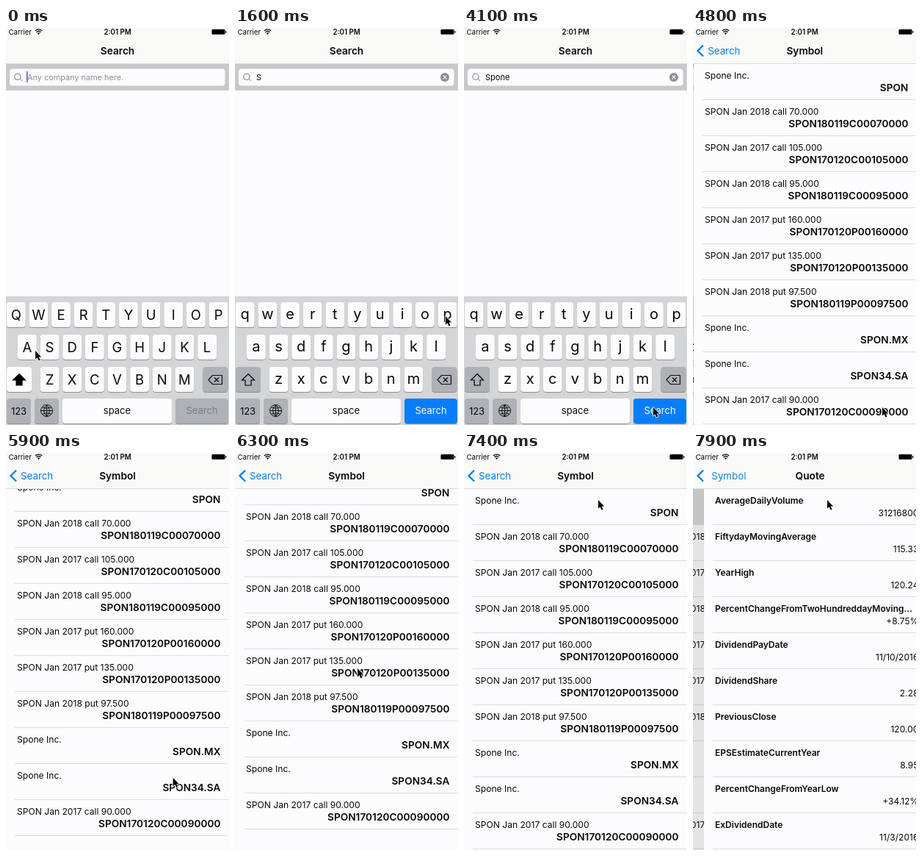
Animation, 304 px wide and 540 px high, one loop 8 s. Source, as an HTML page with a canvas:

```html
<!DOCTYPE html>
<html>
<head>
<meta charset="utf-8">
<style>
html, body { margin: 0; width: 100%; height: 100%; overflow: hidden; background: #fcfcff; }
canvas { display: block; width: 304px; height: 540px; }
</style>
</head>
<body>
<canvas id="stage"></canvas>
<script>
const W = 304, H = 540, LOOP = 8000, STEP = 100;
const INK = '#080808', PAPER = '#fcfcff', BAR = '#f9f9f8', BLUE = '#087fee', GREY = '#8e8e90';
const KEYBOARD = '#d3d5d6', GREY_KEY = '#aeb1b6', LINE = '#dedee0';
const PUSH_LIST = 4520, PUSH_QUOTE = 7742, TAP_ROW = 7600;

const typing = [[1000, 'S'], [1700, 'p'], [2100, 'o'], [2500, 'n'], [3200, 'e']];
const pointer = [
  [0, 40, 439], [300, 53, 438], [1000, 53, 438], [1500, 287, 392], [1800, 287, 392],
  [2050, 262, 393], [2200, 262, 393], [2400, 218, 478], [2550, 218, 478], [2900, 53, 399],
  [3050, 75, 394], [3300, 75, 394], [3900, 258, 516], [5700, 258, 516], [6300, 167, 293],
  [6750, 185, 66], [6800, 185, 65], [7200, 183, 64]
];
const scroll = [[5750, 0], [6100, -42], [6300, -27], [6600, 0], [6800, 5], [7000, 0]];

const symbols = [
  ['Spone Inc.', 'SPON'],
  ['SPON Jan 2018 call 70.000', 'SPON180119C00070000'],
  ['SPON Jan 2017 call 105.000', 'SPON170120C00105000'],
  ['SPON Jan 2018 call 95.000', 'SPON180119C00095000'],
  ['SPON Jan 2017 put 160.000', 'SPON170120P00160000'],
  ['SPON Jan 2017 put 135.000', 'SPON170120P00135000'],
  ['SPON Jan 2018 put 97.500', 'SPON180119P00097500'],
  ['Spone Inc.', 'SPON.MX'],
  ['Spone Inc.', 'SPON34.SA'],
  ['SPON Jan 2017 call 90.000', 'SPON170120C00090000']
];
const quotes = [
  ['AverageDailyVolume', '31216800'],
  ['FiftydayMovingAverage', '115.33'],
  ['YearHigh', '120.24'],
  ['PercentChangeFromTwoHundreddayMoving…', '+8.75%'],
  ['DividendPayDate', '11/10/2016'],
  ['DividendShare', '2.28'],
  ['PreviousClose', '120.00'],
  ['EPSEstimateCurrentYear', '8.95'],
  ['PercentChangeFromYearLow', '+34.12%'],
  ['ExDividendDate', '11/3/2016']
];

const canvas = document.getElementById('stage');
const ctx = canvas.getContext('2d');
const dpr = window.devicePixelRatio || 1;
canvas.width = W * dpr;
canvas.height = H * dpr;

function text(s, x, y, size, { color = INK, weight = 400, align = 'left' } = {}) {
  ctx.font = `${weight} ${size}px Inter, Roboto, sans-serif`;
  ctx.fillStyle = color;
  ctx.textAlign = align;
  ctx.fillText(s, x, y);
}

function rect(x, y, w, h, color) {
  ctx.fillStyle = color;
  ctx.fillRect(x, y, w, h);
}

function rounded(x, y, w, h, r, color) {
  ctx.beginPath();
  ctx.roundRect(x, y, w, h, r);
  ctx.fillStyle = color;
  ctx.fill();
}

function stroke(d, color, width = 1) {
  ctx.strokeStyle = color;
  ctx.lineWidth = width;
  ctx.stroke(new Path2D(d));
}

function shape(d, color) {
  ctx.fillStyle = color;
  ctx.fill(new Path2D(d));
}

function circle(x, y, r, color) {
  ctx.beginPath();
  ctx.arc(x, y, r, 0, 7);
  ctx.fillStyle = color;
  ctx.fill();
}

// Linear keyframes: [time, ...values]
function track(keys, t) {
  const i = keys.findIndex(k => k[0] > t);
  if (i === 0) return keys[0].slice(1);
  if (i < 0) return keys[keys.length - 1].slice(1);
  const a = keys[i - 1], b = keys[i], p = (t - a[0]) / (b[0] - a[0]);
  return a.slice(1).map((v, n) => v + (b[n + 1] - v) * p);
}

// Critically damped spring from 0 to 1
function spring(ms) {
  const x = Math.max(0, ms) * 0.03;
  return 1 - (1 + x) * Math.exp(-x);
}

function key(x, y, w, color = PAPER) {
  rounded(x, y + 1, w, 34, 4, '#8c8e92');
  rounded(x, y, w, 34, 4, color);
}

function letters(row, x, y, upper) {
  [...row].forEach((c, i) => {
    const left = x + i * 30.65;
    key(left, y, 25.8);
    text(upper ? c.toUpperCase() : c, left + 12.9, y + (upper ? 24 : 23), upper ? 18.5 : 20, { align: 'center' });
  });
}

function drawKeyboard(empty) {
  rect(0, 365, W, 175, KEYBOARD);
  letters('qwertyuiop', 0.8, 373, empty);
  letters('asdfghjkl', 16, 417, empty);
  letters('zxcvbnm', 46.6, 461, empty);

  key(1, 461, 34, empty ? PAPER : GREY_KEY);
  const arrow = 'M18 470.5 L26.5 479 H22 V486 H14 V479 H9.5 Z';
  if (empty) shape(arrow, '#000');
  stroke(arrow, '#000', 1.2);

  key(268.5, 461, 34, GREY_KEY);
  stroke('M276 478.5 L281.5 472.5 H294.5 V484.5 H281.5 Z M284 475.5 L290 481.5 M290 475.5 L284 481.5', '#111', 1.2);

  key(1, 504, 33, GREY_KEY);
  text('123', 17.5, 525.5, 13, { align: 'center' });
  key(39, 504, 33, GREY_KEY);
  stroke('M47.5 520.5 a8 8 0 1 0 16 0 a8 8 0 1 0 -16 0 H63.5 M55.5 512.5 V528.5 ' +
    'M55.5 512.5 q-8 8 0 16 q8 -8 0 -16 M49.5 516 q6 2.5 12 0 M49.5 525 q6 -2.5 12 0', '#111', 1);
  key(77, 504, 149);
  text('space', 151.5, 525, 13, { align: 'center' });
  key(231, 504, 72, empty ? GREY_KEY : '#087dff');
  text('Search', 267, 525, 13, { align: 'center', color: empty ? '#7c7e82' : '#fff' });
}

function drawSearch(t) {
  rect(0, 49, W, H - 49, PAPER);
  rect(0, 49, W, 36, '#c9c9cb');
  rounded(5, 55.5, 293.5, 23, 4, PAPER);
  stroke('M19.3 69.5 L22 72.2 M11.8 66.2 a4.1 4.1 0 1 0 8.2 0 a4.1 4.1 0 1 0 -8.2 0', '#77777a', 1);

  const typed = typing.filter(k => k[0] <= t);
  const word = typed.map(k => k[1]).join('');
  const last = typed.length ? typed[typed.length - 1][0] : 0;
  let caret = 28;
  if (word) {
    text(word, 29, 71, 11);
    caret = 29 + ctx.measureText(word).width;
    circle(286, 67, 6, GREY);
    stroke('M283.7 64.7 l4.6 4.6 m0 -4.6 l-4.6 4.6', '#fff', 1.2);
  } else {
    text('Any company name here.', 29, 71, 10.9, { color: GREY });
  }
  if ((t - last) % 1000 < 600) rect(caret, 59, 1.5, 15, '#3c5fc0');
  drawKeyboard(!word);
}

function drawRows(rows, offset, cell, selected = -1) {
  rect(0, 49, W, H - 49, PAPER);
  rows.forEach(([label, detail], i) => {
    const y = 49 + i * 49 + offset;
    if (i === selected) rect(0, y - 1, W, 49, '#d9d9d9');
    text(label, 15, y + 20.2, cell.label, { weight: cell.labelWeight });
    text(detail, 292.5, y + 37, cell.detail, { weight: cell.detailWeight, align: 'right' });
    rect(12, y + 48, W - 12, 1, LINE);
  });
}

const symbolCell = { label: 12.1, labelWeight: 400, detail: 13.7, detailWeight: 600 };
const quoteCell = { label: 12, labelWeight: 600, detail: 12.1, detailWeight: 400 };

function at(x, draw) {
  ctx.save();
  ctx.translate(Math.round(x), 0);
  draw();
  ctx.restore();
}

function push(p, below, above) {
  at(-0.3 * W * p, below);
  rect(0, 49, W, H - 49, `rgba(0,0,0,${0.1 * p})`);
  at(W * (1 - p), above);
}

function fade(alpha, draw) {
  ctx.globalAlpha = Math.max(0, Math.min(1, alpha));
  draw();
  ctx.globalAlpha = 1;
}

function title(s, x) {
  text(s, x, 36, 13.7, { weight: 600, align: 'center' });
}

function drawStatus() {
  text('Carrier', 3.5, 8.7, 9.6);
  stroke('M39.8 3.8 Q44.5 -0.2 49.2 3.8 M41.5 5.7 Q44.5 3.1 47.5 5.7', INK, 1.3);
  shape('M42.7 7 Q44.5 5.6 46.3 7 L44.5 9 Z', INK);
  text('2:01 PM', 152, 8.7, 9.7, { weight: 600, align: 'center' });
  rounded(280.5, 1.8, 18, 7, 1.5, '#000');
  rect(299.2, 4, 1.2, 2.8, '#000');
}

function drawNav(names, level, p) {
  rect(0, 0, W, 49, BAR);
  rect(0, 48.3, W, 0.7, '#d0d0d2');
  drawStatus();
  if (level === 0) return title(names[0], 152);

  fade(level > 1 ? 1 : p, () => stroke('M14 23.5 L6.5 31 L14 38.5', BLUE, 2.3));
  fade(p, () => text(names[level - 1], 20 + 107 * (1 - p), 36, 13.3, { color: BLUE }));
  fade(1 - p * 1.6, () => title(names[level - 1], 152 - 107 * p));
  if (level > 1) fade(1 - p * 2, () => text(names[level - 2], 20 - 90 * p, 36, 13.3, { color: BLUE }));
  fade(p * 1.3, () => title(names[level], 152 + W / 2 * (1 - p)));
}

function drawPointer([x, y]) {
  ctx.save();
  ctx.translate(x, y);
  const d = 'M0 0 V11.5 L2.6 9.2 L4.5 13.4 L6.5 12.5 L4.7 8.5 H8.2 Z';
  ctx.lineJoin = 'round';
  stroke(d, '#fff', 1.6);
  shape(d, '#000');
  ctx.restore();
}

function draw(t) {
  ctx.setTransform(dpr, 0, 0, dpr, 0, 0);
  const level = t < PUSH_LIST ? 0 : t < PUSH_QUOTE ? 1 : 2;
  const p = spring(t - (level > 1 ? PUSH_QUOTE : PUSH_LIST));
  const search = () => drawSearch(t);
  const list = () => drawRows(symbols, track(scroll, t)[0], symbolCell, t >= TAP_ROW ? 0 : -1);
  const quote = () => drawRows(quotes, 0, quoteCell);

  if (level === 0) search();
  else if (level === 1) push(p, search, list);
  else push(p, list, quote);

  drawNav(['Search', 'Symbol', 'Quote'], level, p);
  drawPointer(track(pointer, t));
}

function frame() {
  draw(Math.floor(performance.now() % LOOP / STEP) * STEP);
  requestAnimationFrame(frame);
}
frame();
</script>
</body>
</html>
```
